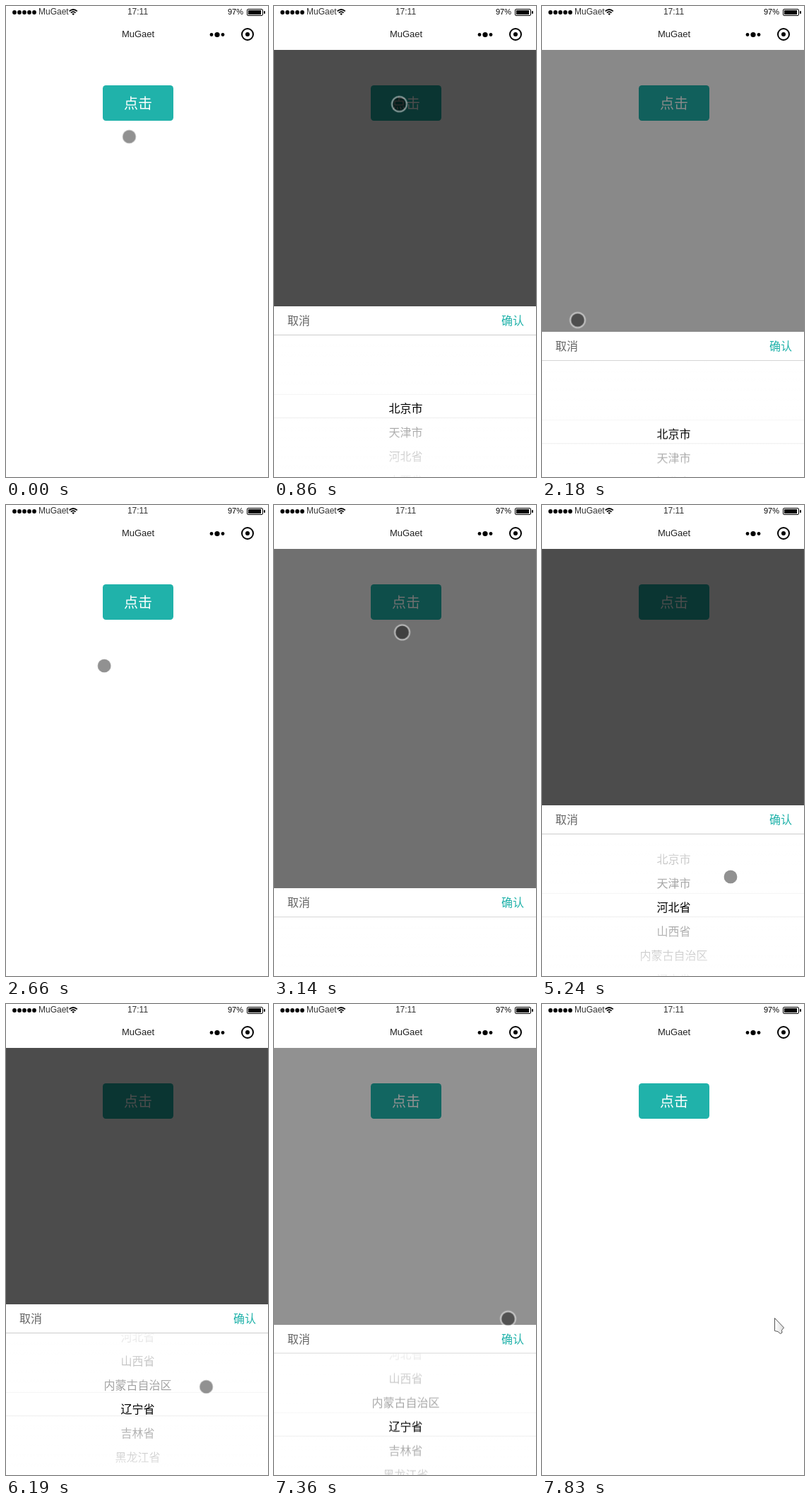
An HTML page for the animation above (7910 ms loop, 371 px wide and 665 px high).

```html
<!DOCTYPE html>
<html lang="zh-CN">
<head>
<meta charset="utf-8">
<title>Region picker</title>
<style>
  html, body { margin: 0; width: 100%; height: 100%; overflow: hidden; background: #fff; }
  svg { display: block; }
  text { font-family: "Liberation Sans", Arial, sans-serif; }
  .zh text, text.zh { font-family: "Noto Sans CJK SC", "Noto Sans CJK", sans-serif; font-size: 16px; font-weight: 350; }
  .mid, .rows text { text-anchor: middle; }

  /* The script steps --t through the loop in ms; every track is sampled there. */
  .anim {
    animation: 7910ms linear infinite paused;
    animation-delay: calc(var(--t, 0) * -1ms);
  }
  .shade { animation-name: shade; }
  .panel { animation-name: panel; }
  .rows { animation-name: scroll; }
  .touch { animation-name: touch; }
  .dot { animation-name: dot; animation-timing-function: step-end; }
  .arrow { animation-name: arrow; animation-timing-function: step-end; }

  @keyframes shade {
    0%, 30.68% { opacity: 0; }
    5.06% { opacity: 0; animation-timing-function: ease; }
    8.85% { opacity: .7; }
    26.89% { opacity: .7; animation-timing-function: ease; }
    37.71% { opacity: 0; animation-timing-function: ease; }
    41.5% { opacity: .7; }
    92.16% { opacity: .7; animation-timing-function: ease; }
    95.95%, 100% { opacity: 0; }
  }
  @keyframes panel {
    0%, 30.5% { transform: translateY(241px); }
    5.06% { transform: translateY(241px); animation-timing-function: ease-in-out; }
    8.85% { transform: none; }
    26.7% { transform: none; animation-timing-function: ease-in-out; }
    37.68% { transform: translateY(241px); animation-timing-function: ease-in-out; }
    41.47% { transform: none; }
    92.16% { transform: none; animation-timing-function: ease-in-out; }
    95.95%, 100% { transform: translateY(241px); }
  }
  @keyframes scroll {
    0%, 50.5% { transform: none; }
    52.5% { transform: translateY(-11px); }
    54.5% { transform: translateY(-28px); }
    56.4%, 61.4% { transform: translateY(-34px); }
    64.4% { transform: translateY(-60px); }
    66.3%, 71.3% { transform: translateY(-68px); }
    74.3% { transform: translateY(-122px); }
    76.2% { transform: translateY(-154px); }
    78.2% { transform: translateY(-166px); }
    80.2%, 100% { transform: translateY(-170px); }
  }
  @keyframes touch {
    0% { transform: translate(174.5px, 184.5px); }
    .99% { transform: translate(172px, 156px); }
    1.98% { transform: translate(169.5px, 131.5px); }
    2.97%, 10.9% { transform: translate(177.5px, 138.5px); }
    14.9% { transform: translate(192px, 178px); }
    17.8% { transform: translate(265px, 278px); }
    19.8% { transform: translate(309.5px, 370px); }
    21.8% { transform: translate(235px, 425px); }
    23.8% { transform: translate(105px, 440px); }
    25.7%, 29.7% { transform: translate(50.5px, 443.5px); }
    33.7% { transform: translate(140px, 225px); }
    35.6%, 37.6% { transform: translate(177.5px, 141px); }
    38.6% { transform: translate(178.5px, 150px); }
    39.6% { transform: translate(181.5px, 179.5px); }
    41.6% { transform: translate(205px, 312px); }
    42.6% { transform: translate(243px, 407px); }
    43.6% { transform: translate(280px, 490px); }
    45.5%, 47% { transform: translate(306px, 545px); }
    49.5% { transform: translate(255px, 555px); }
    50.5% { transform: translate(250px, 554px); }
    52.5% { transform: translate(247px, 543px); }
    54.5% { transform: translate(244.5px, 526.5px); }
    56.4% { transform: translate(247px, 496px); }
    57.4% { transform: translate(250px, 491.5px); }
    60.4% { transform: translate(258px, 550px); }
    61.4% { transform: translate(260px, 556px); }
    64.4% { transform: translate(265px, 530px); }
    66.3%, 68.3% { transform: translate(267px, 525px); }
    70.3% { transform: translate(262px, 590px); }
    71.3% { transform: translate(264px, 598px); }
    74.3% { transform: translate(276px, 548px); }
    78.2% { transform: translate(283.5px, 540.5px); }
    79.2% { transform: translate(286px, 535px); }
    83.2% { transform: translate(321px, 462px); }
    85.1%, 87.1% { transform: translate(326.5px, 444.5px); }
    88.1%, 100% { transform: translate(331.5px, 444.5px); }
  }
  @keyframes dot { 0% { opacity: 1; } 98%, 100% { opacity: 0; } }
  @keyframes arrow { 0% { opacity: 0; } 98%, 100% { opacity: 1; } }
</style>
</head>
<body>
<svg width="371" height="665" viewBox="0 0 371 665">
  <defs>
    <linearGradient id="fadeTop" x2="0" y2="1">
      <stop stop-color="#fff" stop-opacity=".95"/>
      <stop offset="1" stop-color="#fff" stop-opacity=".6"/>
    </linearGradient>
    <linearGradient id="fadeEnd" x2="0" y2="1">
      <stop stop-color="#fff" stop-opacity=".6"/>
      <stop offset="1" stop-color="#fff" stop-opacity=".95"/>
    </linearGradient>
    <linearGradient id="metal">
      <stop stop-color="#fff"/>
      <stop offset="1" stop-color="#dcdcdc"/>
    </linearGradient>
  </defs>
  <rect width="371" height="665" fill="#fff"/>

  <!-- status bar -->
  <g>
    <circle cx="12" cy="9" r="2.9"/>
    <circle cx="19" cy="9" r="2.9"/>
    <circle cx="26" cy="9" r="2.9"/>
    <circle cx="33" cy="9" r="2.9"/>
    <circle cx="40" cy="9" r="2.9"/>
    <text x="46" y="12" font-size="12" fill="#333">MuGaet</text>
    <g fill="none" stroke="#000" stroke-width="1.7">
      <path d="M89.6 7.4Q95.2 2.6 100.8 7.4"/>
      <path d="M91.8 9.6Q95.2 6.7 98.6 9.6"/>
    </g>
    <path d="M93.3 11Q95.2 9.6 97.1 11L95.2 13Z"/>
    <text class="mid" x="186.5" y="12" font-size="12" fill="#333">17:11</text>
    <text x="314" y="12" font-size="11">97%</text>
    <rect x="341.5" y="4.5" width="22" height="9" rx="1.5" fill="none" stroke="#000"/>
    <rect x="343" y="6" width="18" height="6"/>
    <rect x="365" y="7" width="2" height="4" rx="1"/>
  </g>

  <!-- title bar -->
  <g>
    <text class="mid" x="187" y="44" font-size="13" fill="#222">MuGaet</text>
    <circle cx="291" cy="40.5" r="2.4"/>
    <circle cx="299" cy="40.5" r="3.6"/>
    <circle cx="307" cy="40.5" r="2.4"/>
    <circle cx="342" cy="40" r="8" fill="none" stroke="#000" stroke-width="2"/>
    <circle cx="342" cy="40" r="3"/>
  </g>

  <rect x="137" y="112" width="100" height="50" rx="4.5" fill="#20b2aa"/>
  <text class="zh mid" x="187" y="144.5" fill="#fff" style="font-size:20px">点击</text>

  <rect class="anim shade" y="62" width="371" height="603"/>

  <g class="anim panel zh">
    <rect y="424" width="371" height="242" fill="#fff"/>
    <rect y="464" width="371" height="1" fill="#ccc"/>
    <text x="19" y="450" fill="#666">取消</text>
    <text x="322" y="450" fill="#20b2aa">确认</text>
    <svg y="465" width="371" height="200" overflow="hidden">
      <g class="anim rows" id="rows"></g>
      <rect width="371" height="83" fill="url(#fadeTop)"/>
      <rect y="117" width="371" height="83" fill="url(#fadeEnd)"/>
      <rect y="83" width="371" height="1" fill="#f5f5f5"/>
      <rect y="116" width="371" height="1" fill="#eee"/>
    </svg>
  </g>

  <g class="anim dot">
    <g class="anim touch">
      <circle r="9.5" fill="#000" fill-opacity=".43"/>
      <circle r="10.5" fill="none" stroke="#fff" stroke-width="2" stroke-opacity=".52"/>
    </g>
  </g>
  <path class="anim arrow" fill="url(#metal)" stroke="#555" stroke-linejoin="round"
    d="M329.5 443.5V461.5L334 462.5L337.5 465.5L340 464L339.5 460.5L342.5 457Z"/>
</svg>
<script>
  const LOOP = 7910, FRAMES = 101, STEP = LOOP / FRAMES, LEAD = 16;
  const regions = '北京市 天津市 河北省 山西省 内蒙古自治区 辽宁省 吉林省 黑龙江省 上海市 江苏省'.split(' ');

  document.getElementById('rows').innerHTML = regions
    .map((name, i) => `<text x="186.5" y="${109 + 34 * i}">${name}</text>`)
    .join('');

  const root = document.documentElement;
  const start = performance.now();

  // Hold each pose for one step, like a screen recording.
  function tick() {
    const step = Math.floor((performance.now() - start + LEAD) / STEP) % FRAMES;
    root.style.setProperty('--t', (step * STEP).toFixed(2));
    requestAnimationFrame(tick);
  }
  tick();
</script>
</body>
</html>
```
